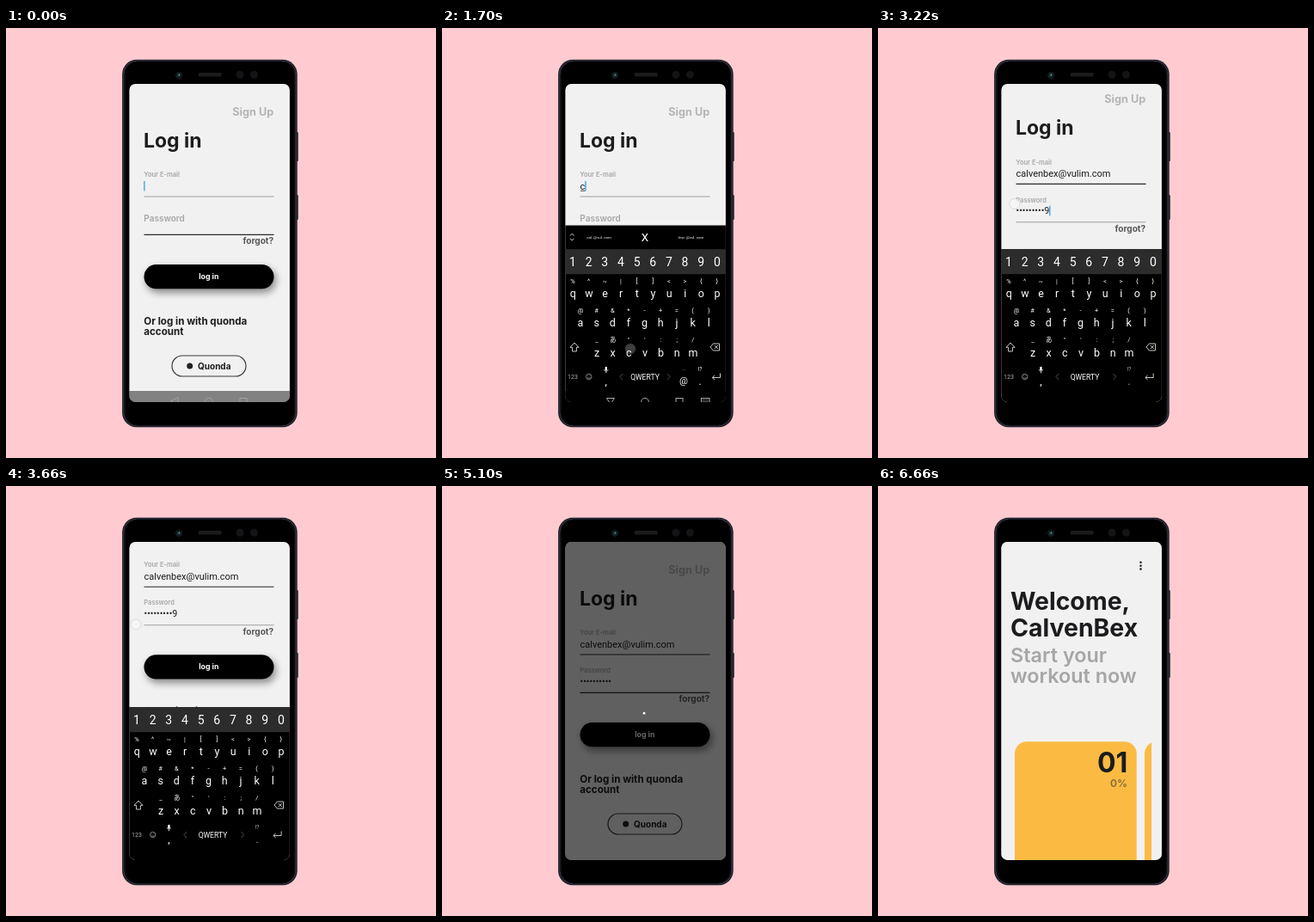
Recreate the animation shown at these times as an HTML page. Size 500 by 500 pixels, loop 7140 ms.

```html
<!DOCTYPE html>
<html lang="en">
<head>
<meta charset="utf-8">
<title>Log in flow</title>
<style>
html, body { margin: 0; width: 100%; height: 100%; overflow: hidden; background: #ffcbd0; }
svg { display: block; width: 100vw; height: 100vh; }
text { font-family: Inter, sans-serif; font-weight: 700; fill: #1c1c1e; white-space: pre; }
.k, .k text, .in { font-family: Roboto, "Noto Sans CJK JP", sans-serif; font-weight: 400; }
.k text { fill: #fff; text-anchor: middle; }
.k .dim { fill: #b5b5b5; }
.ic { fill: none; stroke: #ddd; stroke-width: .9; }
.mute { fill: #a6a6a8; font-weight: 600; }
</style>
</head>
<body>
<svg id="stage" viewBox="0 0 500 500">
  <defs>
    <clipPath id="screen"><rect x="143.4" y="65" width="186.5" height="369.9" rx="7"/></clipPath>
    <clipPath id="cardArea"><rect x="159" y="290" width="159" height="146"/></clipPath>
    <filter id="blur" x="-20%" y="-60%" width="140%" height="240%"><feGaussianBlur stdDeviation="4"/></filter>
  </defs>
  <rect width="500" height="500" fill="#ffcbd0"/>

  <g id="phone">
    <rect x="337" y="121" width="2.8" height="34" rx="1" fill="#2a2b37"/>
    <rect x="337" y="194" width="2.8" height="29" rx="1" fill="#2a2b37"/>
    <rect x="135.1" y="36.8" width="203.6" height="427.4" rx="17" fill="#1d1e28"/>
    <rect x="136.9" y="38" width="200" height="425" rx="16" fill="#000" stroke="#4b4c59" stroke-width=".8"/>
    <rect x="138.5" y="39" width="196.8" height="423" rx="15" fill="#000" stroke="#14141a" stroke-width=".8"/>
    <circle cx="201" cy="55" r="4" fill="#14191c"/>
    <circle cx="201" cy="55" r="1.8" fill="#1f4a4c"/>
    <circle cx="201.6" cy="54.2" r=".7" fill="#69a6a2"/>
    <rect x="223.5" y="52" width="27.5" height="4.6" rx="2.3" fill="#1b1b1d"/>
    <circle cx="272" cy="54.3" r="4.5" fill="#141416"/>
    <circle cx="288.5" cy="54.3" r="4.5" fill="#141416"/>
  </g>

  <g clip-path="url(#screen)">
    <rect x="143" y="64" width="187" height="372" fill="#f1f1f1"/>

    <g id="form">
      <text x="311.2" y="101.8" font-size="12.7" text-anchor="end" style="fill:#b5b5b7">Sign Up</text>
      <text x="160" y="138.6" font-size="23">Log in</text>
      <text x="160.3" y="173.2" font-size="7.5" class="mute">Your E-mail</text>
      <text id="email" class="in" x="160.5" y="187.7" font-size="11"></text>
      <path id="compose" d="M161 189.3h5.5" stroke="#222" stroke-width=".8"/>
      <path id="line1" d="M160.5 196h151" stroke-width="1.1"/>
      <text id="passLabel" x="160.3" class="mute"></text>
      <text id="pass" class="in" x="160.5" y="231" font-size="10.8"></text>
      <path id="line2" d="M160.5 240.4h151" stroke-width="1.1"/>
      <rect id="caret" width="1.2" height="11.5" fill="#2b95e0"/>
      <text x="311.2" y="251.3" font-size="10.1" text-anchor="end" style="fill:#58585a">forgot?</text>
      <rect x="163" y="279" width="151" height="29" rx="14" opacity=".42" filter="url(#blur)"/>
      <rect x="160.5" y="275" width="151" height="28.3" rx="14.1" fill="#000"/>
      <text x="235.8" y="291.6" font-size="8.8" text-anchor="middle" style="fill:#fff">log in</text>
      <text x="160.3" y="344.5" font-size="11.6">Or log in with quonda</text>
      <text x="160.3" y="357" font-size="11.6">account</text>
      <rect x="193" y="381" width="86" height="24" rx="12" fill="none" stroke="#3a3a3c" stroke-width="1.2"/>
      <circle cx="213.7" cy="393" r="3.5" fill="#222"/>
      <text x="223" y="396.5" font-size="10">Quonda</text>
    </g>

    <g id="kb" class="k"></g>
    <g id="nav">
      <rect x="143" y="422" width="187" height="14"/>
      <g id="navIcons" class="ic" style="stroke:#bbb">
        <path id="navBack" d="M200 429.5v9l-8.5-4.5z"/>
        <circle cx="236" cy="434.5" r="4.3"/>
        <rect x="272" y="430.5" width="8" height="8"/>
        <g id="navKb"><path d="M191.5 430.5h9l-4.5 7z"/><rect x="301.5" y="430.5" width="9.5" height="6"/><path d="M303 432.5h6.5M303 434.5h6.5" stroke-dasharray="1 .8"/></g>
      </g>
    </g>

    <rect id="shade" x="143" y="64" width="187" height="372"/>
    <path id="spin" fill="none" stroke="#fff" stroke-width="2.4"/>

    <g id="home">
      <rect x="143" y="64" width="187" height="372" fill="#f1f1f1"/>
      <g fill="#222"><circle cx="305.5" cy="88.8" r="1.3"/><circle cx="305.5" cy="92.7" r="1.3"/><circle cx="305.5" cy="96.6" r="1.3"/></g>
      <text x="154" y="144" font-size="28.4">Welcome,</text>
      <text x="154" y="175.3" font-size="28.4">CalvenBex</text>
      <text x="154" y="204.6" font-size="23.4" class="mute">Start your</text>
      <text x="154" y="229" font-size="23.4" class="mute">workout now</text>
      <g id="cards" clip-path="url(#cardArea)">
        <rect x="159" y="297.2" width="141.7" height="170" rx="14" fill="#fbbb42"/>
        <rect x="310" y="297.2" width="141.7" height="170" rx="14" fill="#fbbb42"/>
        <text x="290.3" y="332.8" font-size="32" text-anchor="end">01</text>
        <text x="290" y="350.4" font-size="12" text-anchor="end" style="fill:#80693a;font-weight:600">0%</text>
      </g>
    </g>
    <circle id="touch" r="6" fill="#f6f6f8" stroke="#c4c4c8" stroke-width=".6"/>
  </g>
</svg>

<script>
const LOOP = 7140, EMAIL = "calvenbex@vulim.com", STEP = 18.65;
const $ = id => document.getElementById(id);
const set = (id, attrs) => { for (const a in attrs) $(id).setAttribute(a, attrs[a]); };
const show = (id, on) => set(id, { visibility: on ? "visible" : "hidden" });
const ramp = (t, a, b) => Math.min(1, Math.max(0, (t - a) / (b - a)));
const smooth = p => p * p * (3 - 2 * p);
const out = p => 1 - (1 - p) ** 3;
const mix = (a, b, p) => a + (b - a) * p;

$("passLabel").textContent = "Password";

// Keyboard
const label = (s, x, y, size, cls = "") =>
  `<text x="${x}" y="${y}" font-size="${size}" class="${cls}">${s.replace("&", "&amp;").replace("<", "&lt;")}</text>`;
const row = (s, x, y, size) => [...s].map((c, i) => label(c, x + i * STEP, y, size)).join("");

// The bottom row spreads out by `shift` when the password field has focus
function bottomRow(id, shift, body) {
  return `<g id="${id}">${label("QWERTY", 236 + shift, 409, 8.6)}
    <path class="ic" style="stroke:#555" d="M210 402l-3 3.5 3 3.5M${262 + shift * 2.6} 402l3 3.5-3 3.5"/>
    <path class="ic" transform="translate(${-shift * .75} 0)" d="M323.5 401.5v5h-9M317 404l-2.8 2.5 2.8 2.5"/>
    <g transform="translate(${-shift * .3} 0)">
      <rect x="189.6" y="393.8" width="2.4" height="4.6" rx="1.2" fill="#fff"/>
      <path class="ic" d="M188.4 397.3q2.4 4 4.8 0M190.8 399.3v2"/>${label(",", 190.8, 415, 12)}</g>${body}</g>`;
}

$("kb").innerHTML = `
  <g id="strip"><rect x="143" y="229.5" width="187" height="29"/>
    <path class="ic" d="M149 241.5l2.2-2.3 2.2 2.3M149 244.8l2.2 2.3 2.2-2.3"/>
    ${label("cal..@vul..com", 182.5, 244.5, 4.4)}${label("few..@vul..com", 289.5, 244.5, 4.4)}
    <text x="236" y="248" font-size="12" style="font-family:Inter,sans-serif;font-weight:500">X</text></g>
  <rect x="143" y="257.2" width="187" height="180"/>
  <rect x="143" y="257.2" width="187" height="29" fill="#2c2c2d"/>
  ${row("1234567890", 152, 276.7, 14)}
  ${row("%^~|[]<>{}", 152, 297, 7.5)}${row("qwertyuiop", 152.2, 313, 12.5)}
  ${row("@#&*-+=()", 161, 331.3, 7.5)}${row("asdfghjkl", 161, 347, 12.5)}
  ${row("_あ\"':;/", 180, 365.4, 7.5)}${row("zxcvbnm", 180, 381.7, 12.5)}
  <path class="ic" d="M154 366l5 5.3h-2.6v4.7h-4.8v-4.7H149z"/>
  <path class="ic" d="M312 371l3.3-4h7.2v8h-7.2zM316.8 369l4 4m0-4l-4 4"/>
  ${label("123", 152, 408, 7, "dim")}
  <g class="ic" style="stroke:#a5a5a5;stroke-width:.8"><circle cx="170.7" cy="405.5" r="3.2"/><path d="M169 406.5q1.7 1.8 3.4 0M169.3 404.3h.6M171.5 404.3h.6"/></g>
  ${bottomRow("keysMail", 0, label("@", 281, 414, 11) + label("...", 281, 398, 6, "dim") + label(".", 300, 415, 12) + label("!?", 300, 399.4, 6.5))}
  ${bottomRow("keysPass", 4.5, label(".", 292, 415, 12, "dim") + label("!?", 292, 399.4, 6.5, "dim"))}`;

// Finger: start, end, x and y at both ends, opacity
const touches = [
  [1480, 1780, 219, 373, 219, 373, .25],
  [1820, 1980, 182, 243, 182, 243, .6],
  [2000, 2160, 190, 222, 190, 222, .8],
  [2340, 2920, 158, 276, 291, 276, .7],
  [3100, 3780, 159, 205, 151, 161, .85],
  [3840, 4020, 236, 210, 236, 210, .6]
];

function drawTouch(t) {
  const hit = touches.find(([a, b]) => t >= a && t < b);
  show("touch", hit);
  if (!hit) return;
  const [a, b, x0, y0, x1, y1, alpha] = hit;
  const drag = a === 3100;
  const p = drag ? smooth(ramp(t, 3190, 3650)) : ramp(t, a, b);
  set("touch", {
    cx: mix(x0, x1, p), cy: mix(y0, y1, p),
    opacity: alpha * ramp(t, a - 20, a + 60) * (1 - ramp(t, b - 60, b))
  });
}

function drawForm(t) {
  const scroll = 14 * smooth(ramp(t, 2100, 2300)) + 64.7 * smooth(ramp(t, 3195, 3660))
    - 78.7 * smooth(ramp(t, 3900, 4260));
  set("form", { transform: `translate(0 ${-scroll})` });

  const filled = t >= 1900, focusPass = t >= 2100, sent = t >= 3860;
  $("email").textContent = filled ? EMAIL : t >= 1640 ? "c" : "";
  show("compose", t >= 1640 && !filled);
  set("line1", { stroke: focusPass ? "#2a2a2c" : "#a0a0a2" });
  set("line2", { stroke: focusPass && !sent ? "#a0a0a2" : "#2a2a2c" });

  const lift = smooth(ramp(t, 2100, 2240));
  set("passLabel", { y: mix(225.3, 217.2, lift), "font-size": mix(10, 7.5, lift) });
  const n = t < 2380 ? 0 : Math.min(10, 1 + Math.floor((t - 2380) / 57));
  $("pass").textContent = sent ? "•".repeat(n) : n ? "•".repeat(n - 1) + Math.max(1, n - 1) : "";

  show("caret", t < 3600);
  const mailX = filled ? 270 : t >= 1640 ? 166.3 : 160.3;
  const passX = n ? 167 + 3.58 * (n - 1) : 160.3;
  set("caret", focusPass ? { x: passX, y: 221.3 } : { x: mailX, y: 178 });
}

function drawKeyboard(t) {
  const down = 207 * (1 - out(ramp(t, 100, 840)) + smooth(ramp(t, 3900, 4220)));
  set("kb", { transform: `translate(0 ${down})` });
  const mail = t < 2100, opened = t >= 300;
  show("strip", mail);
  show("keysMail", mail);
  show("keysPass", !mail);
  show("nav", t < 2040);
  show("navKb", opened && t < 2040);
  show("navBack", !opened);
  const fade = ramp(t, 100, 320);
  set("nav", { opacity: mix(.46, 1, fade) });
  set("navIcons", { opacity: mix(.4, 1, fade) });
}

function drawLoader(t) {
  set("shade", { opacity: .6 * ramp(t, 3980, 4300) });
  show("spin", t >= 4320);
  const head = mix(-170, 104, smooth(ramp(t, 4300, 4740))) + 181 * smooth(ramp(t, 5180, 5470));
  const tail = mix(-178, 88, smooth(ramp(t, 4640, 5080)));
  const at = deg => {
    const r = deg * Math.PI / 180;
    return `${236 + 9.3 * Math.cos(r)} ${255 + 9.3 * Math.sin(r)}`;
  };
  set("spin", { d: `M${at(tail)}A9.3 9.3 0 ${head - tail > 180 ? 1 : 0} 1 ${at(head)}` });
}

function draw(t) {
  drawForm(t);
  drawKeyboard(t);
  drawLoader(t);
  drawTouch(t);
  set("home", { opacity: t < 5740 ? 0 : ramp(t, 5700, 5860) });
  set("cards", { opacity: t < 6620 ? 0 : t < 6660 ? .5 : 1 });
}

const start = performance.now();
function tick() {
  draw((performance.now() - start) % LOOP);
  requestAnimationFrame(tick);
}
tick();
</script>
</body>
</html>
```
